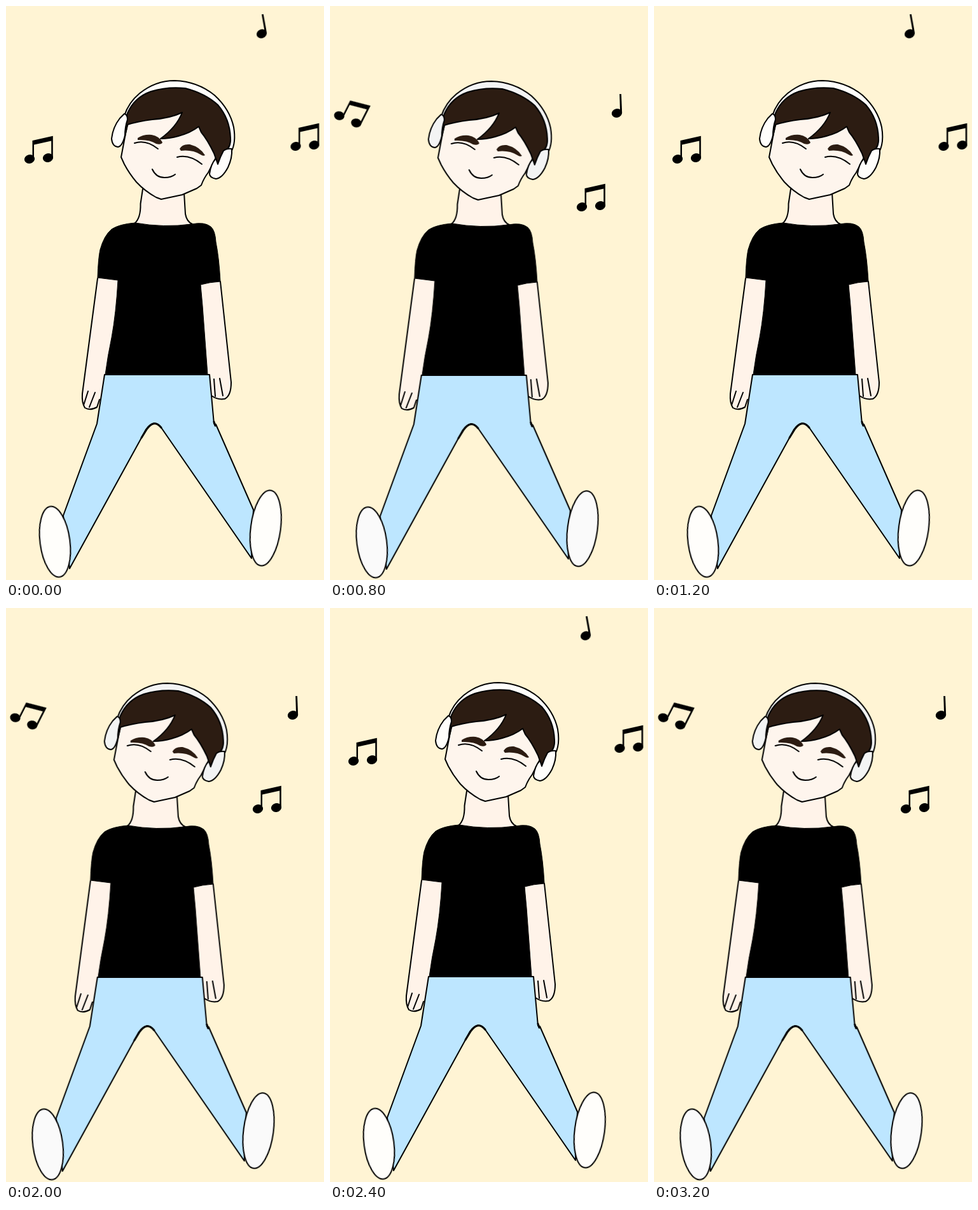
An HTML page that plays this animation: 500x900 px, repeating every 3.6 s.

```html
<!DOCTYPE html>
<html lang="en">
<head>
<meta charset="utf-8">
<title>Listening to music</title>
<style>
  html, body { margin: 0; width: 100%; height: 100%; overflow: hidden; background: #fff4d4; }
  svg { display: block; width: 500px; height: 900px; }
  .ink { fill: none; stroke: #000; stroke-width: 2; stroke-linecap: round; stroke-linejoin: round; }
  .skin { fill: #fff3e9; }
  .face { fill: #fef5ed; }
  .hair { fill: #2c1c12; }
  .jeans { fill: #bde6ff; }
  .white { fill: #fffefb; }
</style>
</head>
<body>
<svg viewBox="0 0 500 900">
  <defs>
    <!-- Notes are placed by the centre of their first head. -->
    <g id="pair">
      <ellipse rx="8.2" ry="6.8" transform="rotate(-12)"/>
      <ellipse cx="29" cy="-2" rx="8.2" ry="6.8" transform="rotate(-12 29 -2)"/>
      <path d="M4.5 0V-29L36.8-36.2V-2H34.2V-28.6L7-22.5V0Z"/>
    </g>
    <g id="single">
      <ellipse rx="8.2" ry="6.8" transform="rotate(-12)"/>
      <path d="M5.2 0L4.2-30H7L8.2 0Z"/>
    </g>
  </defs>

  <g id="figure" class="ink">
    <!-- arms -->
    <path class="skin" stroke="none" d="M144 425L120 608Q119 622 124 630Q132 635 143 629L160 575L178 425Z"/>
    <path d="M144 427L120 608Q119 622 124 630Q132 635 143 629L147 617M129 604L122 626M140 606L131 629"/>
    <path class="skin" stroke="none" d="M303 432L314 575L324 612Q333 618 344 616Q353 611 354 590L337 431Z"/>
    <path d="M337 432L354 590Q354 611 344 616Q333 618 323 611M327 585L329 612M336 584L341 611"/>

    <!-- jeans and shoes -->
    <path class="jeans" d="M155 578H320L327 655L330 656L389 790L386 866L244 661Q233 646 220 664L213 677L100 882L90 799L143 655Z"/>
    <path stroke-width="3" d="M213 677L221 664Q233 647 244 661M327 652L329 658"/>
    <g class="white shade">
      <ellipse cx="77" cy="840" rx="23.5" ry="55.8" transform="rotate(-7.5 77 840)"/>
      <ellipse cx="408.3" cy="818.5" rx="23.5" ry="59.6" transform="rotate(7.5 408.3 818.5)"/>
    </g>

    <!-- neck and shirt -->
    <path class="skin" d="M215 287L211.500 310Q212 333 202 341L248 350L293 342Q284 338 282 326L280 293"/>
    <path fill="#000" stroke-width="1" d="M203 340Q248 348 292 342Q312 338 322 346Q329 352 330 370Q335 395 337 432Q320 433 306 437L309 470L317 578H156Q160 548 166 520Q173 482 176 430L144 426Q145 395 148 382Q154 360 166 350Q178 342 203 340Z"/>

    <!-- headband, face, hair -->
    <path class="white shade" d="M186 172Q193 151 210 137Q235 117 265 117Q301 118 328 140Q352 162 358 190Q362 214 354 229L340 230L300 160L200 180Z"/>
    <path class="face" d="M188 200L181 237L186 248Q194 263 205 276Q218 290 236 300L244 303L277 296L300 286L307 281Q311 270 318 261L334 230L300 175L265 150L193 178Z"/>
    <path class="hair" d="M187 204Q185 184 191 168Q202 143 228 134Q254 126 282 129Q313 137 333 155Q352 177 353 207Q354 222 343 229Q336 238 333 248L327 231Q317 210 307 198L303 189Q290 199 271 204Q257 208 243 208Q268 190 277 167Q258 176 230 178Q207 181 191 186Z"/>

    <!-- ear cups -->
    <path class="white shade" d="M186 169Q191 170 191 178Q187 190 187 203Q183 220 176 221Q167 220 166 208Q168 190 179 176Z"/>
    <path class="white shade" d="M342 227Q347 223 355 224Q356 238 349 253Q340 270 330 271Q320 269 320 263Q322 248 330 239L333 248Q337 236 342 227Z"/>

    <!-- features -->
    <path class="hair" stroke="none" d="M207 207Q216 201 229 202Q241 204 246 214Q244 218 236 216Q226 209 207 210Z"/>
    <path class="hair" stroke="none" d="M273 224Q277 216 289 217Q305 221 313 234Q310 236 306 233Q293 225 275 227Z"/>
    <path d="M202 215Q220 209 239 224M269 237Q288 232 308 248M230 256Q236 269 249 269Q260 269 266 264"/>
  </g>

  <use class="note" href="#pair"/>
  <use class="note" href="#single"/>
  <use class="note" href="#pair"/>
</svg>

<script>
  const LOOP = 1200;

  // Holds every value for an equal share of the loop, then jumps to the next.
  function hold(el, prop, values) {
    const frames = [...values, values[0]].map((value, i) => ({
      [prop]: value, offset: i / values.length, easing: "step-end"
    }));
    el.animate(frames, { duration: LOOP, iterations: Infinity });
  }

  const place = ([x, y, turn = 0]) => `translate(${x}px, ${y}px) rotate(${turn}deg)`;

  // x, y and turn for each of the three poses
  const body = [[0, 0], [-5.5, 0.5], [-11.3, 1]];
  const notes = [
    [[37, 240], [25, 206, 13], [14.5, 172, 27]],
    [[402, 43.5, -8], [427, 106, -4], [451, 168]],
    [[455.5, 220], [426, 268], [396, 315]]
  ];

  hold(document.getElementById("figure"), "transform", body.map(place));
  document.querySelectorAll(".note").forEach((el, i) =>
    hold(el, "transform", notes[i].map(place)));
  document.querySelectorAll(".shade > ellipse, path.shade").forEach(el =>
    hold(el, "fill", ["#fffefb", "#fffefb", el.tagName === "path" ? "#f3f4f4" : "#fafafa"]));
</script>
</body>
</html>
```
